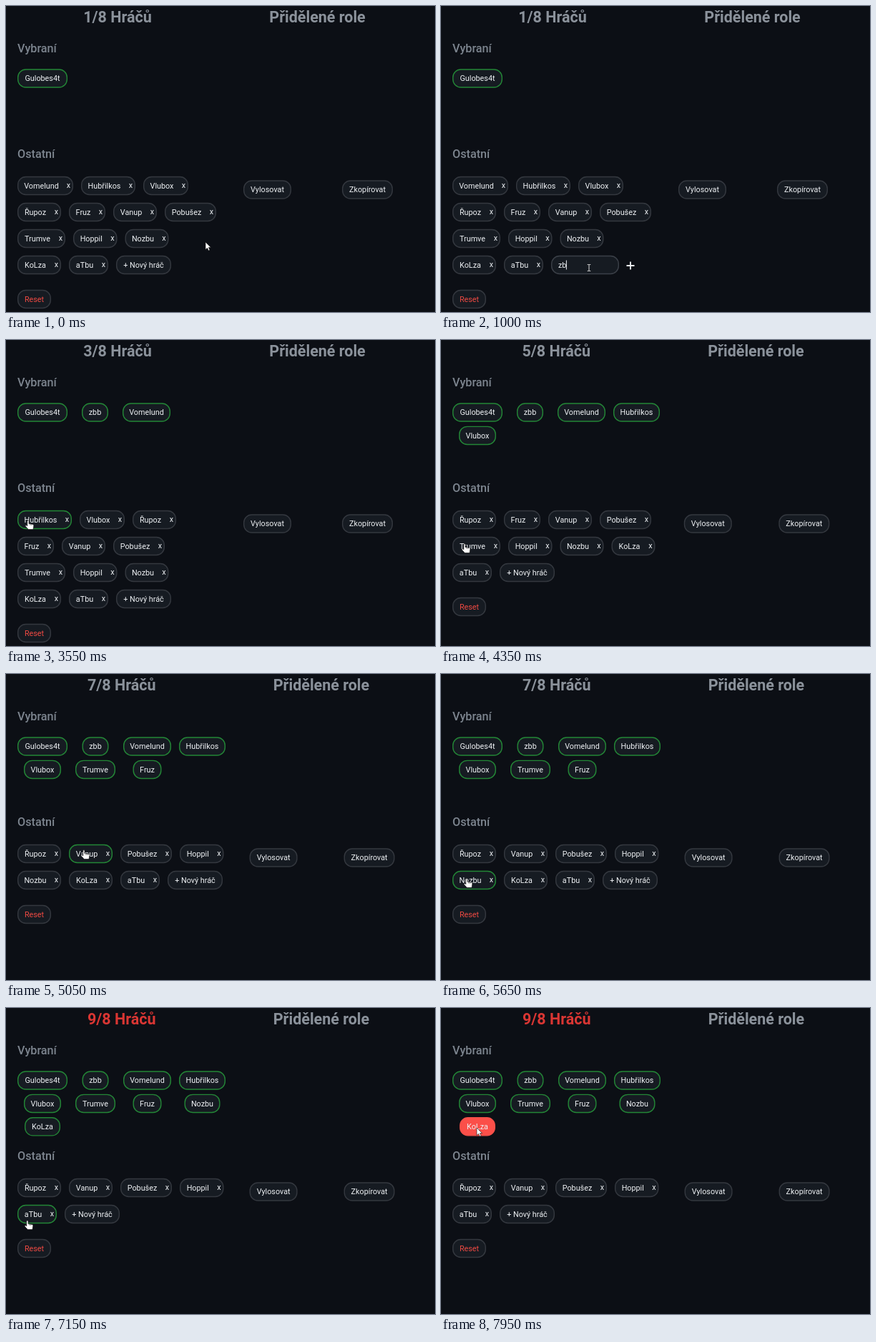
An HTML page that plays this animation: 600 by 429 pixels, repeating every 8000 ms.

```html
<!DOCTYPE html>
<html lang="cs">
<head>
<meta charset="utf-8">
<title>Hráči</title>
<style>
  html, body { margin: 0; height: 100%; overflow: hidden; background: #0c0f15; }
  svg { display: block; width: 100vw; height: 100vh; font: 10.8px Roboto, sans-serif; cursor: default; }
  .title { font-size: 21.5px; font-weight: 700; }
  .section { font-size: 16.2px; font-weight: 500; fill: #7d858f; }
</style>
</head>
<body>
<svg id="stage" viewBox="0 0 600 429"></svg>
<script>
const LOOP = 8000, LEFT = 16, GAP = 11, CHIP_H = 26.5, CROSS = 11;
const GREY = '#34383f', GREEN = '#238636', RED = '#da3633', WHITE = '#eef1f4', DIM = '#8b929b';

// Chip widths, including the room for the remove cross
const WIDTHS = {
  Gulobes4t: 81, Vomelund: 78, Hubřilkos: 76, Vlubox: 63, Řupoz: 61, Fruz: 51, Vanup: 61, Pobušez: 72,
  Trumve: 67, Hoppil: 61.5, Nozbu: 61, KoLza: 61, aTbu: 55, zbb: 48
};
const PLAYERS = Object.keys(WIDTHS);
const ADD = '+ Nový hráč', ADD_W = 77, INPUT_W = 95;
const OPEN_AT = 500, ADDED_AT = 1750;
const KEYS = [800, 950, 1200];

const PICKS = [
  [0, 'Gulobes4t'], [2650, 'zbb'], [3350, 'Vomelund'], [3700, 'Hubřilkos'], [4050, 'Vlubox'],
  [4400, 'Trumve'], [4850, 'Fruz'], [5800, 'Nozbu'], [7100, 'KoLza']
];

// Pointer path: time, x, y
const PATH = [
  [0, 279, 331], [350, 215, 362], [500, 207, 367], [1250, 207, 367], [1600, 264, 366], [1850, 264, 366],
  [2380, 225, 392], [2490, 164, 370], [2800, 164, 370], [3150, 40, 262], [3300, 31, 253], [4150, 31, 253],
  [4350, 33, 286], [4500, 33, 286], [4750, 109, 247], [5200, 109, 247], [5650, 36, 287], [5850, 30, 288],
  [6250, 30, 300], [7250, 30, 298], [7700, 50, 168], [8000, 50, 168]
];

function pointerAt(t) {
  const i = Math.max(1, PATH.findIndex(p => p[0] > t));
  const [t0, x0, y0] = PATH[i - 1], [t1, x1, y1] = PATH[i];
  const u = Math.min(1, Math.max(0, (t - t0) / (t1 - t0)));
  const e = u * u * (3 - 2 * u);
  return [x0 + (x1 - x0) * e, y0 + (y1 - y0) * e];
}

const inside = ([px, py], b) => px >= b.x && px <= b.x + b.w && Math.abs(py - b.y) <= CHIP_H / 2;

const text = (x, y, s, fill = WHITE, cls = '', anchor = 'middle') =>
  `<text x="${x}" y="${y}" fill="${fill}" class="${cls}" text-anchor="${anchor}">${s}</text>`;

function pill({ x, y, w }, label, { stroke = GREY, fill = '#161b22', color = WHITE, cross = false } = {}) {
  const mid = x + (cross ? w - CROSS : w) / 2;
  return `<rect x="${x + .7}" y="${y - CHIP_H / 2 + .7}" width="${w - 1.4}" height="${CHIP_H - 1.4}" rx="11"
    fill="${fill}" stroke="${stroke}" stroke-width="1.4"/>`
    + text(mid, y + 3.8, label, color)
    + (cross ? text(x + w - 6.5, y + 3.3, 'x') : '');
}

// Four columns, each as wide as its widest chip
function placeSelected(names) {
  const cols = [55, 55, 55, 55];
  const size = n => WIDTHS[n] - CROSS;
  names.forEach((n, i) => cols[i % 4] = Math.max(cols[i % 4], size(n)));
  const starts = cols.map((_, c) => LEFT + cols.slice(0, c).reduce((a, w) => a + w + GAP, 0));
  const boxes = names.map((n, i) => ({
    name: n, w: size(n), x: starts[i % 4] + (cols[i % 4] - size(n)) / 2, y: 101.5 + 32.4 * Math.floor(i / 4)
  }));
  return { boxes, width: Math.max(280, starts[3] + cols[3] - LEFT) };
}

function placeRest(items, limit) {
  let x = LEFT, y = 252;
  return items.map(([name, w]) => {
    if (x + w > limit) { x = LEFT; y += 37; }
    const box = { name, x, y, w };
    x += w + GAP;
    return box;
  });
}

const POINTERS = {
  arrow: '<path d="M0 0V10.5L2.5 8.3 4.2 12 6 11.2 4.4 7.6H7.6Z" fill="#fff" stroke="#111" stroke-width=".6"/>',
  hand: `<path d="M-1.2 .8C-1.2-.5 1-.5 1 .8V4.5L6.5 5.4Q7.9 5.7 7.8 7.2L7 12.5H.3L-3.6 8.2C-4.3 7.2-3 6.2-2.2 7L-1.2 7.8Z"
    fill="#fff" stroke="#111" stroke-width=".6"/><path d="M2.9 5V7M4.9 5.3V7.2" stroke="#444" stroke-width=".6"/>`,
  beam: '<path d="M-2.2-4.5H-.5L0-4 .5-4.5H2.2M0-4V4M-2.2 4.5H-.5L0 4 .5 4.5H2.2" fill="none" stroke="#ddd"/>'
};

function scene(t) {
  const picked = PICKS.filter(p => p[0] <= t).map(p => p[1]);
  const { boxes: selected, width } = placeSelected(picked);
  const editing = t >= OPEN_AT && t < ADDED_AT;
  const rest = PLAYERS.filter(n => !picked.includes(n) && (n !== 'zbb' || t >= ADDED_AT)).map(n => [n, WIDTHS[n]]);
  rest.push([ADD, editing ? INPUT_W : ADD_W]);
  const others = placeRest(rest, LEFT + width);
  const last = others[others.length - 1];

  const now = pointerAt(t), before = pointerAt(t - 100);
  const hot = b => inside(now, b) && inside(before, b);
  const count = picked.length;
  const shift = (width - 280) / 11.5;
  let out = text(156 + 6 * shift, 23, `${count}/8 Hráčů`, count > 8 ? RED : count === 8 ? GREEN : DIM, 'title')
    + text(435.5 + 5.7 * shift, 23, 'Přidělené role', DIM, 'title')
    + text(LEFT, 65, 'Vybraní', '', 'section', 'start')
    + text(LEFT, 213.3, 'Ostatní', '', 'section', 'start');

  for (const b of selected)
    out += pill(b, b.name, hot(b) ? { stroke: '#f85149', fill: '#fb4f49' } : { stroke: GREEN });

  for (const b of others) {
    if (b !== last) out += pill(b, b.name, { stroke: hot(b) ? GREEN : GREY, cross: true });
    else if (!editing) out += pill(b, ADD, { stroke: hot(b) ? GREEN : GREY });
  }
  if (editing) {
    const typed = 'zbb'.slice(0, KEYS.filter(k => k <= t).length);
    const caretX = last.x + 10 + [0, 5.4, 11.4, 17.5][typed.length];
    const px = last.x + INPUT_W + 16, py = last.y + 1;
    out += pill(last, '', { stroke: '#3b4048' }) + text(last.x + 10, last.y + 3.8, typed, WHITE, '', 'start');
    if ((t - OPEN_AT) % 1000 < 600)
      out += `<path d="M${caretX} ${last.y - 6.5}v13" stroke="${WHITE}"/>`;
    out += `<path d="M${px - 5.5} ${py}h11M${px} ${py - 5.5}v11" stroke="${WHITE}" stroke-width="1.8"/>`;
  }

  out += pill({ x: LEFT, y: last.y + 48, w: 47 }, 'Reset', { color: '#f04a43' })
    + pill({ x: 332 + 9 * shift, y: 257.5, w: 67 }, 'Vylosovat')
    + pill({ x: 470 + 2.7 * shift, y: 257.5, w: 71 }, 'Zkopírovat');

  const overPlus = editing && Math.abs(now[0] - 265) < 9;
  const over = others.find(b => inside(now, b));
  const kind = editing && over === last ? 'beam' : over || overPlus ? 'hand' : 'arrow';
  return out + `<g transform="translate(${now[0].toFixed(1)} ${now[1].toFixed(1)})">${POINTERS[kind]}</g>`;
}

const stage = document.getElementById('stage');
const start = performance.now();
let shown = '';
function tick() {
  const markup = scene((performance.now() - start) % LOOP);
  if (markup !== shown) stage.innerHTML = shown = markup;
  requestAnimationFrame(tick);
}
tick();
</script>
</body>
</html>
```
